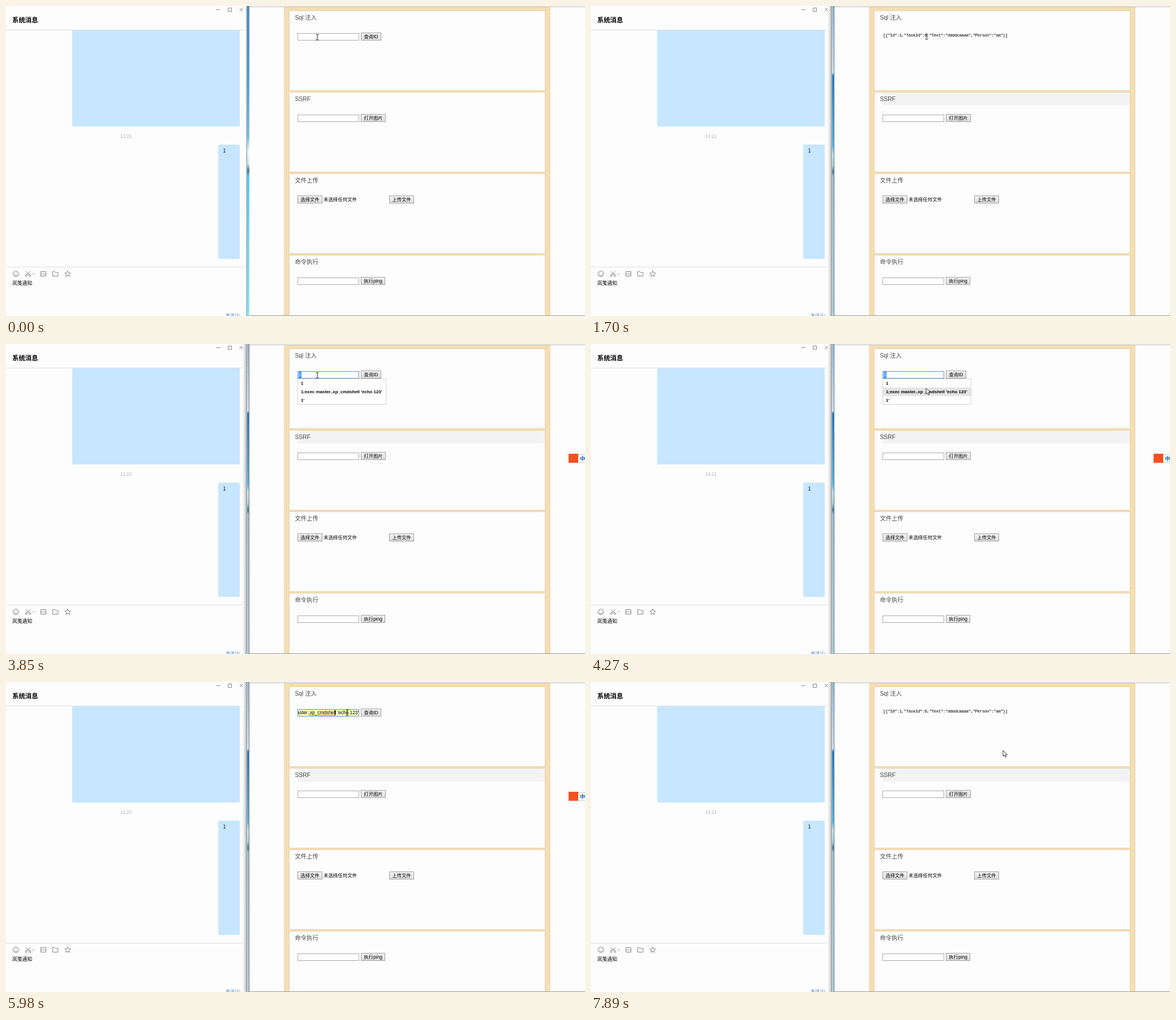
Animation, 1023 px wide and 548 px high, one loop 8 s. Source, as an HTML page with a canvas:

```html
<!DOCTYPE html>
<html lang="zh">
<head>
<meta charset="utf-8">
<style>
html, body { margin: 0; width: 100%; height: 100%; overflow: hidden; background: #fdfdfd; }
canvas { display: block; }
</style>
</head>
<body>
<canvas id="stage" width="1023" height="548"></canvas>
<script>
const ctx = document.getElementById('stage').getContext('2d');
const LOOP = 8000;
const UI = '"Noto Sans CJK SC","Noto Sans CJK",sans-serif';
const ARIAL = '"Liberation Sans","Noto Sans CJK SC",sans-serif';
const MONO = '"Liberation Mono",monospace';
const RESULT = '[{"Id":1,"TaskId":0,"Text":"ddddcaaaa","Person":"aa"}]';
const COMMAND = "1;exec master..xp_cmdshell 'echo 123'";
const HISTORY = ['1', COMMAND, "1'"];

// Each entry changes the state from its time onwards.
const timeline = [
  [0, { view: 'form', cursor: 'beam', x: 550, y: 55, value: '', list: [], row: -1 }],
  [220, { active: true, ime: true, focus: true, caret: 519 }],
  [430, { value: '1', list: HISTORY, caret: 522 }],
  [640, { x: 572, y: 56, list: [] }],
  [850, { x: 608, y: 56 }],
  [1060, { cursor: 'arrow', x: 638, y: 52, hover: true }],
  [1280, { view: 'result', ime: false, focus: false, hover: false, caret: 0 }],
  [1490, { x: 622, y: 53 }],
  [1700, { cursor: 'beam', x: 593, y: 54 }],
  [1910, { cursor: 'arrow', x: 583, y: 59 }],
  [2130, { x: 579, y: 62 }],
  [2340, { menu: true }],
  [2550, { x: 583, y: 65, row: 0 }],
  [2770, { x: 586, y: 67 }],
  [2980, { x: 587, y: 68 }],
  [3190, { view: 'form', menu: false, row: -1, x: 576, y: 65 }],
  [3410, { cursor: 'beam', x: 550, y: 55, focus: true, ime: true, selected: true }],
  [3850, { list: HISTORY }],
  [4060, { cursor: 'arrow', x: 560, y: 67, row: 0 }],
  [4270, { x: 592, y: 78, row: 1 }],
  [4490, { x: 617, y: 77 }],
  [4700, { value: COMMAND, selected: false, filled: true, list: [], row: -1 }],
  [4910, { x: 636, y: 54, hover: true }],
  [5340, { cursor: 'beam', x: 611, y: 57, hover: false }],
  [5550, { caret: 621 }],
  [5760, { scrolled: true, caret: 622, x: 606, y: 55 }],
  [5980, { caret: 582, x: 603, y: 54 }],
  [6190, { list: [COMMAND] }],
  [6820, { caret: 0, x: 612, y: 54 }],
  [7040, { caret: 582, x: 621, y: 54 }],
  [7250, { cursor: 'arrow', x: 640, y: 52, hover: true }],
  [7460, { view: 'result', list: [], focus: false, ime: false, hover: false, caret: 0 }],
  [7680, { x: 690, y: 92 }],
  [7890, { x: 728, y: 121 }]
];

function rect(x, y, w, h, fill, stroke) {
  if (fill) { ctx.fillStyle = fill; ctx.fillRect(x, y, w, h); }
  if (stroke) {
    ctx.strokeStyle = stroke;
    ctx.lineWidth = 1;
    ctx.strokeRect(x + .5, y + .5, w - 1, h - 1);
  }
}

// y is the visual middle of the line
function text(s, x, y, size, color = '#000', font = UI, align = 'left', weight = '') {
  ctx.font = `${weight} ${size}px ${font}`;
  ctx.textAlign = align;
  ctx.fillStyle = color;
  ctx.fillText(s, x, y + size * .36);
}

function path(d, stroke, fill, width = 1) {
  const p = new Path2D(d);
  if (fill) { ctx.fillStyle = fill; ctx.fill(p); }
  if (stroke) { ctx.strokeStyle = stroke; ctx.lineWidth = width; ctx.stroke(p); }
}

function gradient(y0, y1, stops, x0 = 0, x1 = 0) {
  const g = ctx.createLinearGradient(x0, y0, x1, y1);
  stops.forEach(([at, color]) => g.addColorStop(at, color));
  return g;
}

function bubble(x, y, w, h, radius) {
  ctx.fillStyle = '#c7e6ff';
  ctx.beginPath();
  ctx.roundRect(x, y, w, h, radius);
  ctx.fill();
}

function button(label, x, y, w, hover) {
  const stops = hover ? [[0, '#fcfcfc'], [1, '#e8e8e8']] : [[0, '#f5f5f5'], [1, '#dcdcdc']];
  rect(x, y, w, 14, gradient(y, y + 14, stops), hover ? '#777' : '#a0a0a0');
  text(label, x + w / 2, y + 7.2, 8.4, '#000', ARIAL, 'center');
}

function field(y, fill = '#fff', border = '#aaa') {
  rect(515, y, 109, 13, fill, border);
}

function star(cx, cy, r) {
  let d = '';
  for (let i = 0; i < 10; i++) {
    const a = i * Math.PI / 5 - Math.PI / 2, k = i % 2 ? r * .45 : r;
    d += `${i ? 'L' : 'M'}${cx + k * Math.cos(a)} ${cy + k * Math.sin(a)}`;
  }
  return d + 'Z';
}

function chat() {
  rect(0, 0, 426, 548, '#fdfdfd');
  path('M371.5 6.5h7M392.5 3.5h6v6h-6zM413 3.5l5.5 5.5m0-5.5l-5.5 5.5', '#777', null, .9);
  text('系统消息', 11, 25, 11.4, '#000', UI, 'left', 'bold');
  rect(0, 42, 425, 1, '#dedede');
  bubble(117, 43, 296, 170, [0, 0, 2, 2]);
  text('11:22', 212, 230, 8, '#aaa', UI, 'center');
  bubble(375, 245, 38, 202, 2);
  text('1', 386, 256, 9.5, '#111', UI, 'center');
  rect(0, 461, 425, 1, '#dedede');
  const ink = '#777';
  path('M22.5 473.5a5 5 0 1 1-10 0a5 5 0 1 1 10 0M14.7 474.5a2.9 2.9 0 0 0 5.6 0M15.5 471v1.5M19.5 471v1.5', ink, null, .9);
  path('M35 469l7 7M43 469l-7 7M37.5 476.5a1.7 1.7 0 1 1-3.4 0a1.7 1.7 0 1 1 3.4 0M44 476.5a1.7 1.7 0 1 1-3.4 0a1.7 1.7 0 1 1 3.4 0M47 472.5l1.8 1.8l1.8-1.8', ink, null, .9);
  path('M61.5 469.5h9v8h-9zM61.5 475l3-2.5l2.5 2l1.5-1.5l2 2', ink, null, .9);
  path('M82.5 477.5v-8h3.5l1.5 1.5h4.5v6.5z', ink, null, .9);
  path(star(109, 473.7, 5.4), ink, null, .9);
  text('岚笺通知', 11, 489.7, 8.8);
  text('发送(S)', 388, 547.5, 8, '#4d86d8');
}

function divider(active) {
  if (active) {
    rect(418, 0, 8, 548, gradient(0, 0, [[0, '#fdfdfd'], [.55, '#dcdcdc'], [1, '#959a9e']], 418, 426));
    rect(426, 0, 4, 548, gradient(0, 548, [[0, '#9dbbd2'], [.215, '#d8e6f0'], [.225, '#2f7db8'],
      [.45, '#5db4e0'], [.48, '#cfe6ef'], [.515, '#b4d4df'], [.535, '#54798e'], [.55, '#a5c3d0'], [1, '#b4d3da']]));
    rect(429, 0, 1, 548, '#587587');
  } else {
    rect(424, 0, 1, 548, '#dadcde');
    rect(425, 0, 1, 548, '#8a9aa5');
    rect(426, 0, 4, 548, gradient(0, 548, [[0, '#4a8cc2'], [.2, '#4a9bd2'], [.42, '#72c0e6'],
      [.47, '#eefaff'], [.51, '#c3e9f5'], [.53, '#3c7c9e'], [.55, '#5ccaf0'], [1, '#8de4f6']]));
  }
}

function page() {
  rect(430, 0, 593, 548, '#fdfdfd');
  rect(430, 1, 593, 1, '#bbb');
  rect(491, 2, 471, 545, '#f5deb3');
  ['Sql 注入', 'SSRF', '文件上传', '命令执行'].forEach((title, i) => {
    const y = 9 + i * 144;
    rect(500, y - 1, 453, 142, '#e5d4b0');
    rect(501, y, 451, 140, '#fdfdfd');
    if (i === 1 && state.active) rect(515, y, 437, 23, '#f3f3f3');
    text(title, 510.5, y + 11.5, 10.3, '#444', ARIAL);
  });
  field(192);
  button('打开图片', 627, 191, 44);
  button('选择文件', 515, 335, 44);
  text('未选择任何文件', 561, 342, 8.45, '#000', ARIAL);
  button('上传文件', 677, 335, 44);
  field(480);
  button('执行ping', 627, 479, 43);
  rect(430, 547, 593, 1, '#999');
}

function queryForm() {
  const { value, focus, filled, scrolled, caret, list } = state;
  field(48, filled ? '#faffbd' : '#fff', focus ? '#5b94d6' : '#aaa');
  if (state.selected) rect(517, 49, 5, 11, '#3390ff');
  ctx.save();
  ctx.beginPath();
  ctx.rect(516, 49, 107, 11);
  ctx.clip();
  const shown = value.length > 1 && !scrolled ? COMMAND.slice(0, 26) : value;
  text(shown, scrolled ? 623 : 517, 54.3, 8.35, state.selected ? '#fff' : '#000', ARIAL, scrolled ? 'right' : 'left');
  if (filled) {
    const x = scrolled ? 536 : 574;
    let wave = `M${x} 59`;
    for (let i = 1; i <= 23; i++) wave += `L${x + i * 2} ${i % 2 ? 58.2 : 59.2}`;
    path(wave, '#e33', null, .8);
  }
  if (caret) rect(caret - 1, 50, 1, 9, '#000');
  ctx.restore();
  button('查询ID', 627, 47, 36, state.hover);
  if (list.length) {
    rect(515, 61, 157, 1 + list.length * 15, '#fff', '#d5d5d5');
    list.forEach((item, i) => {
      const y = 62 + i * 15;
      if (state.row === i) rect(516, y, 155, 15, '#e4e4e4');
      text(item, 521, y + 7.5, 7.87, '#000', ARIAL, 'left', 'bold');
    });
  }
}

function result() {
  ctx.letterSpacing = '-0.61px';
  text(RESULT, 516, 51.5, 7.8, '#000', MONO);
  ctx.letterSpacing = '0px';
}

const menuItems = [
  [72, '返回(B)', 'Alt+向左箭头'], [87, '前进(F)', 'Alt+向右箭头'], [101, '重新加载(R)', 'Ctrl+R'],
  [122, '另存为(A)...', 'Ctrl+S'], [137, '打印(P)...', 'Ctrl+P'], [151, '投射(C)...', ''],
  [166, '翻成中文（简体）(T)', ''], [187, '检查此[框架页面]使用的代理', ''],
  [208, '查看网页源代码(V)', 'Ctrl+U'], [223, '查看框架的源代码(V)', ''],
  [237, '重新加载框架(F)', ''], [252, '检查(N)', 'Ctrl+Shift+I']
];

function menu() {
  rect(582, 65, 187, 197, '#9a9a9a');
  rect(579, 62, 188, 198, '#fdfdfd', '#a5a5a5');
  if (state.row === 0) rect(581, 64, 185, 15, '#e9e9e9');
  [111, 176, 197].forEach(y => rect(581, y, 185, 1, '#e3e3e3'));
  menuItems.forEach(([y, label, keys], i) => {
    text(label, 602, y, 7.6, i === 1 ? '#999' : '#111');
    text(keys, 751, y, 7.6, i === 0 && state.row === 0 ? '#111' : '#999', UI, 'right');
  });
  ctx.fillStyle = '#25a5e5';
  ctx.beginPath();
  ctx.arc(591, 187, 5, 0, 7);
  ctx.fill();
}

function inputBadge() {
  rect(1006, 195, 20, 15, '#fff', '#b8cfe0');
  rect(994, 194, 17, 16, '#f4511e');
  text('中', 1014, 202.5, 9.5, '#1565b5', UI, 'left', 'bold');
}

function pointer() {
  ctx.save();
  ctx.translate(state.x, state.y);
  if (state.cursor === 'beam') {
    path('M-2.5-4.5h2l.5.5l.5-.5h2M0-4v8.5M-2.5 5h2l.5-.5l.5.5h2', '#111', null, .9);
  } else {
    path('M0 0v10.5l2.4-2.2l1.7 3.7l1.7-.8l-1.7-3.6h3.3z', '#222', '#fff', .9);
  }
  ctx.restore();
}

let state;
function frame(now) {
  const t = now % LOOP;
  state = Object.assign({}, ...timeline.filter(([at]) => at <= t).map(([, change]) => change));
  chat();
  page();
  divider(state.active);
  if (state.view === 'form') queryForm();
  else result();
  if (state.menu) menu();
  if (state.ime) inputBadge();
  pointer();
  requestAnimationFrame(frame);
}
requestAnimationFrame(frame);
</script>
</body>
</html>
```
